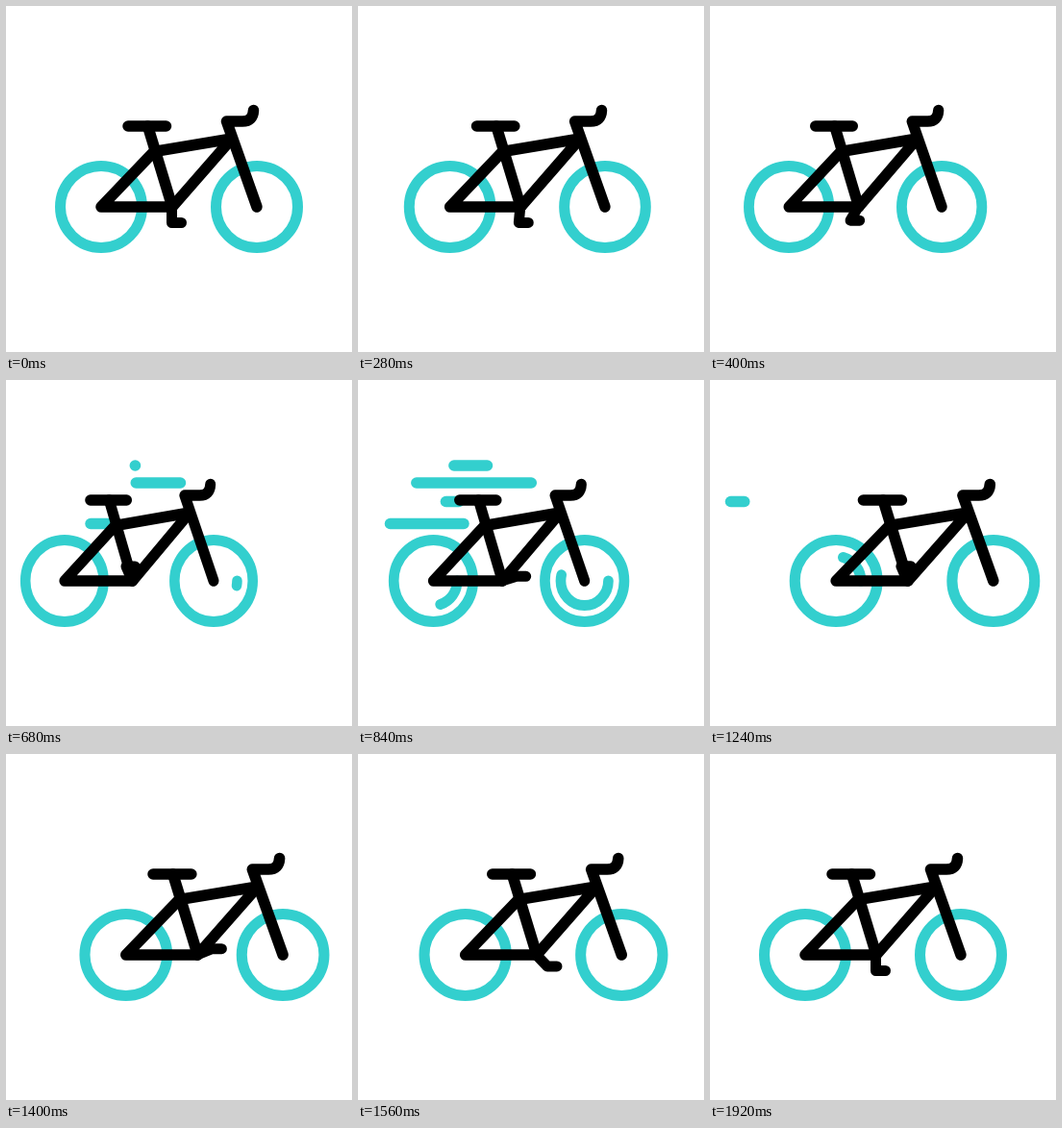
These frames come from a looping animation (360 px wide and 360 px high, 2000 ms). An HTML page with a canvas:

```html
<!DOCTYPE html>
<html lang="en">
<head>
<meta charset="utf-8">
<title>Bicycle</title>
<style>
  html, body { margin: 0; width: 100%; height: 100%; overflow: hidden; background: #fff; }
  canvas { display: block; width: 100vmin; height: 100vmin; margin: 0 auto; }
</style>
</head>
<body>
<canvas id="stage"></canvas>
<script>
const SIZE = 360, LOOP = 2000, STEP = 40;
const TEAL = '#33cfce', BLACK = '#000';
const HUB_Y = 209, REAR_X = -81, FRONT_X = 81, CRANK_X = -7.5;

// time, centre x, horizontal squash
const POSES = [
  [200, 180, 1],
  [640, 137.5, 0.957],
  [1240, 213, 1.01],
  [1800, 180, 1]
];

// y, right end, left end, head start, tail start, tail duration
const STREAKS = [
  [89, 134.5, 59, 670, 950, 280],
  [107, 181.5, 53, 534, 824, 280],
  [126.5, 105, 21.5, 748, 937, 411],
  [149.5, 110, 21.5, 563, 871, 280]
];

const canvas = document.getElementById('stage');
const ctx = canvas.getContext('2d');
const start = performance.now();

const mix = (a, b, k) => a + (b - a) * k;

// eased progress from 0 to 1
function ease(t, from, duration) {
  const k = Math.min(1, Math.max(0, (t - from) / duration));
  return k * k * (3 - 2 * k);
}

function fit() {
  const side = Math.min(innerWidth, innerHeight) * (devicePixelRatio || 1);
  canvas.width = canvas.height = Math.max(1, Math.round(side));
}

function stroke(color, width) {
  ctx.strokeStyle = color;
  ctx.lineWidth = width;
  ctx.stroke();
}

function line(color, width, ...points) {
  ctx.beginPath();
  points.forEach(([x, y]) => ctx.lineTo(x, y));
  stroke(color, width);
}

function arc(x, radius, from, to, width) {
  ctx.beginPath();
  ctx.arc(x, HUB_Y, radius, from, to);
  stroke(TEAL, width);
}

function pose(t) {
  let [, x, squash] = POSES[0];
  for (let i = 1; i < POSES.length; i++) {
    const [from] = POSES[i - 1], [to, nextX, nextSquash] = POSES[i];
    const k = ease(t, from, to - from);
    x = mix(x, nextX, k);
    squash = mix(squash, nextSquash, k);
  }
  return { x, squash };
}

function drawStreaks(t) {
  for (const [y, right, left, headAt, tailAt, tailTime] of STREAKS) {
    const head = ease(t, headAt, 360), tail = ease(t, tailAt, tailTime);
    if (head > tail) line(TEAL, 11.5, [mix(right, left, head), y], [mix(right, left, tail), y]);
  }
}

function drawWheel(x, t) {
  arc(x, 42.5, 0, Math.PI * 2, 11);
  const end = ease(t, 640, 380), begin = ease(t, 930, 310);
  if (end > begin) arc(x, 25.5, begin * Math.PI * 2, end * Math.PI * 2, 11);
}

function drawFrame() {
  line(BLACK, 11.5, [-53, 125], [-13.5, 125]);
  line(BLACK, 11.5, [-32.5, 125], [-7, HUB_Y]);
  line(BLACK, 11.5, [REAR_X, HUB_Y], [-26, 151.5], [55, 138], [-7, HUB_Y], [REAR_X, HUB_Y], [-26, 151.5]);
  ctx.beginPath();
  ctx.moveTo(FRONT_X, HUB_Y);
  ctx.lineTo(49.5, 120);
  ctx.lineTo(66, 120);
  ctx.quadraticCurveTo(77, 120, 77.5, 108.5);
  stroke(BLACK, 11.5);
}

function drawCrank(t) {
  const turn = ease(t, 200, 1600) * Math.PI * 4;
  const x = CRANK_X - 16.5 * Math.sin(turn), y = HUB_Y + 16.5 * Math.cos(turn);
  line(BLACK, 11, [CRANK_X, HUB_Y], [x, y], [x + 10, y]);
}

function draw(t) {
  const zoom = canvas.width / SIZE;
  ctx.setTransform(zoom, 0, 0, zoom, 0, 0);
  ctx.fillStyle = '#fff';
  ctx.fillRect(0, 0, SIZE, SIZE);
  ctx.lineCap = ctx.lineJoin = 'round';

  drawStreaks(t);
  const { x, squash } = pose(t);
  ctx.translate(x, 0);
  ctx.scale(squash, 1);
  drawWheel(REAR_X, t - 90);
  drawWheel(FRONT_X, t);
  drawFrame();
  drawCrank(t);
}

function tick() {
  const t = (performance.now() - start) % LOOP;
  draw(Math.floor(t / STEP) * STEP);
  requestAnimationFrame(tick);
}

addEventListener('resize', fit);
fit();
tick();
</script>
</body>
</html>
```
